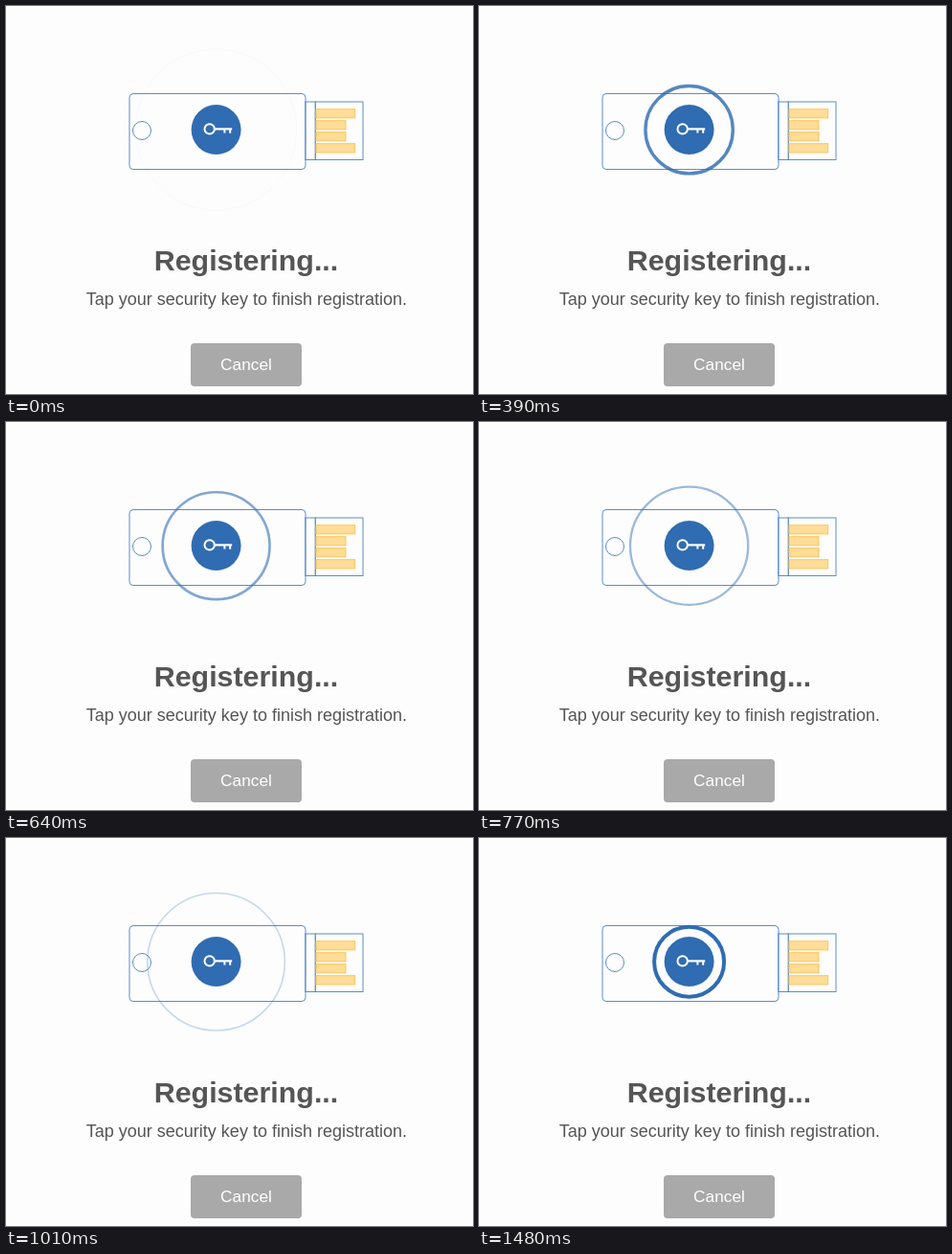
These frames come from a looping animation (488 by 405 pixels, 1.58 s). An HTML page:

```html
<!DOCTYPE html>
<html lang="en">
<head>
<meta charset="utf-8">
<title>Registering</title>
<style>
  html, body { margin: 0; width: 100%; height: 100%; overflow: hidden; background: #fdfdfd; }
  svg { display: block; width: 488px; height: 405px; }
  text { font-family: "Liberation Sans", Arial, sans-serif; text-anchor: middle; fill: #555; }
  .line { fill: none; stroke: #5a8cc8; stroke-width: 1; }
  .pin { fill: #ffdc98; stroke: #fcc556; stroke-width: 1; }
</style>
</head>
<body>
<svg viewBox="0 0 488 405">
  <g class="line">
    <rect x="129" y="91.5" width="184" height="79" rx="4"/>
    <circle cx="142" cy="130" r="9.5"/>
    <rect x="312.8" y="100" width="10.5" height="60.5"/>
    <rect x="323.3" y="100" width="49.7" height="60.5"/>
  </g>
  <g class="pin">
    <rect x="324" y="107.7" width="40.7" height="9.2"/>
    <rect x="324" y="119.7" width="31" height="9.2"/>
    <rect x="324" y="131.6" width="31" height="9.2"/>
    <rect x="324" y="143.7" width="40.7" height="9.2"/>
  </g>
  <circle id="ring" cx="219.6" cy="129.2" fill="none" stroke="#306cb2"/>
  <circle cx="219.6" cy="129.1" r="26" fill="#306cb2"/>
  <g fill="none" stroke="#fff">
    <circle cx="212.7" cy="128.4" r="5.2" stroke-width="2"/>
    <path d="M218 128.4H236.2" stroke-width="2.2"/>
    <path d="M228.4 128.4V132.4M234.2 128.4V132.8" stroke-width="2"/>
  </g>
  <text x="251" y="276" font-size="30.4" font-weight="700">Registering...</text>
  <text x="251.4" y="312" font-size="18">Tap your security key to finish registration.</text>
  <rect x="193" y="352" width="116" height="45" rx="4" fill="#a9a9a9"/>
  <text x="251" y="380" font-size="17.3" style="fill:#fff">Cancel</text>
</svg>
<script>
  const LOOP = 1580, START = 140, GROW = 1200, RESTART = 1480;
  const ring = document.getElementById("ring");
  const clamp = v => Math.min(1, Math.max(0, v));

  // Gentle ease in and out.
  const ease = p => p - 0.1 * Math.sin(2 * Math.PI * p) / (2 * Math.PI);

  function progress(t) {
    if (t < START) return 1;
    if (t >= RESTART) return 0;
    return ease(clamp((t - START) / GROW));
  }

  function draw(t) {
    const k = progress(t);
    const outer = 38.5 + 46 * k;
    const width = 4 - 3.2 * k;
    ring.setAttribute("r", outer - width / 2);
    ring.setAttribute("stroke-width", width);
    ring.setAttribute("stroke-opacity", Math.max(0.04, 1 - k));
  }

  let begin;
  function tick(now) {
    begin ??= now;
    draw((now - begin) % LOOP);
    requestAnimationFrame(tick);
  }
  draw(0);
  requestAnimationFrame(tick);
</script>
</body>
</html>
```
